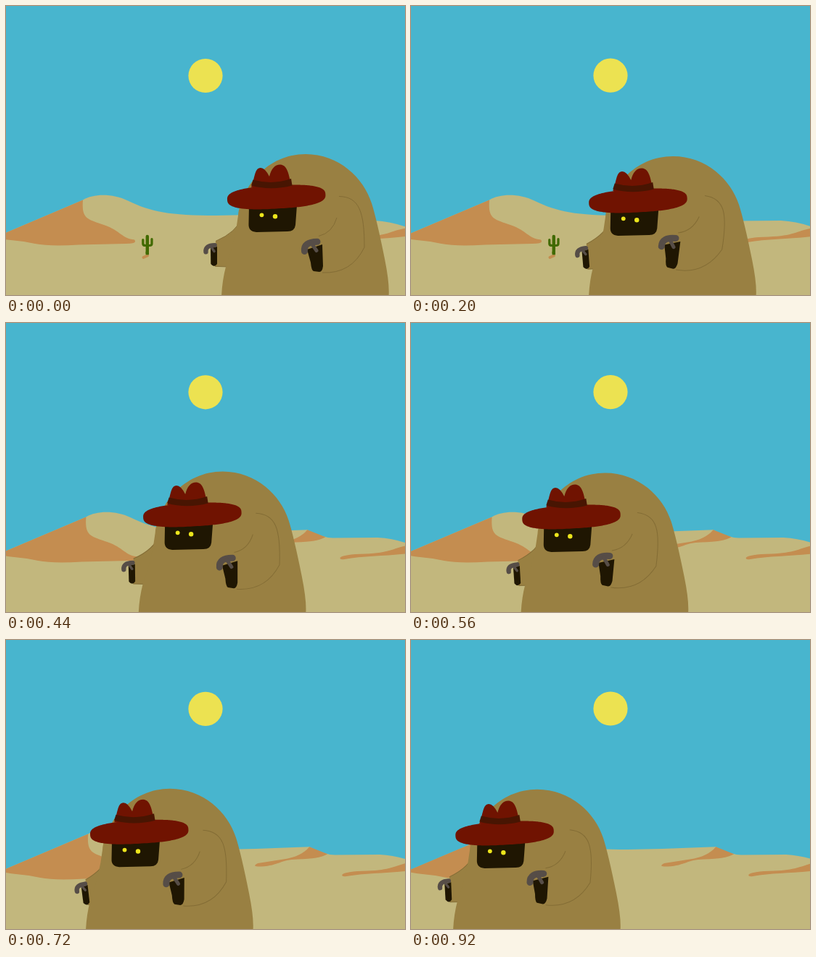
An HTML page with a canvas that plays this animation: 550x400 px, repeating every 960 ms.

```html
<!DOCTYPE html>
<html lang="en">
<head>
<meta charset="utf-8">
<title>Desert wanderer</title>
<style>
  html, body { margin: 0; width: 100%; height: 100%; overflow: hidden; background: #48b5ce; }
  canvas { display: block; }
</style>
</head>
<body>
<canvas id="stage" width="550" height="400"></canvas>
<script>
const ctx = document.getElementById('stage').getContext('2d');
const STEP_MS = 40, STEPS = 24, STRIDE = 10;

const color = {
  sky: '#48b5ce', sun: '#ece251', sand: '#c2b77d', shade: '#c48d50', cactus: '#416a00',
  robe: '#998042', seam: '#836c35', dark: '#1f1602', claw: '#564d47',
  hat: '#701301', band: '#481502', eye: '#ece51c'
};

function fill(path, paint) {
  ctx.fillStyle = paint;
  ctx.fill(new Path2D(path));
}

function line(path, paint, width = 1) {
  ctx.strokeStyle = paint;
  ctx.lineWidth = width;
  ctx.stroke(new Path2D(path));
}

function disc(x, y, r, paint) {
  ctx.fillStyle = paint;
  ctx.beginPath();
  ctx.arc(x, y, r, 0, 2 * Math.PI);
  ctx.fill();
}

function group(draw) {
  ctx.save();
  draw();
  ctx.restore();
}

// Applies a linear map around (x, y), then shifts by (dx, dy).
function pivot(x, y, a, b, c, d, dx, dy) {
  ctx.translate(x + dx, y + dy);
  ctx.transform(a, b, c, d, 0, 0);
  ctx.translate(-x, -y);
}

function superellipse(x, y, rx, ry, tilt, power, paint) {
  const bend = v => Math.sign(v) * Math.abs(v) ** (2 / power);
  group(() => {
    ctx.translate(x, y);
    ctx.rotate(tilt);
    ctx.beginPath();
    for (let a = 0; a < 2 * Math.PI; a += 0.03) {
      ctx.lineTo(rx * bend(Math.cos(a)), ry * bend(Math.sin(a)));
    }
    ctx.fillStyle = paint;
    ctx.fill();
  });
}

function drawCactus() {
  ctx.lineCap = 'round';
  line('M189.5 348L195 345.5', color.shade, 4);
  line('M194.8 319V342', color.cactus, 4.4);
  line('M188.8 323.5V329Q189 331.5 192 331.5H198Q201 331.5 201 329V322.5', color.cactus, 3.2);
  ctx.lineCap = 'butt';
  line('M194.8 340V344.3', color.cactus, 4.4);
}

function drawDunes() {
  fill('M-30 401V326.5L106 268.5C122 259 148 260 168 269.5C200 285 225 290 290 290'
    + 'Q350 289 411 286.3Q430 297 446 297.5L508 297Q541 299 570 314V401Z', color.sand);
  fill('M-16 320.5L106 268.5C104 295 112 295 135 303S160 322 177 323.5'
    + 'Q182 329 165 329L100 330.5Q60 333 40 329T0 323.3Z', color.shade);
  fill('M411 286.3Q400 300 375 303.5L340 309Q330 314 345 313.5'
    + 'C370 312 370 304 395 303.5Q425 303 436 296.3Z', color.shade);
  fill('M456 325Q460 320 491 319.5C530 318 530 310 555 307V318.5'
    + 'C520 323 490 322 462 327Q456 328 456 325Z', color.shade);
}

function drawDesert(step) {
  ctx.fillStyle = color.sky;
  ctx.fillRect(0, 0, 550, 400);
  disc(275, 96.5 - 0.065 * step, 23.6, color.sun);
  group(() => {
    ctx.translate(0.4 * step, 0);
    drawDunes();
    drawCactus();
  });
}

function drawClaw(x, y, size) {
  group(() => {
    ctx.translate(x, y);
    ctx.scale(size, size);
    ctx.lineCap = 'round';
    line('M4.5 19Q3 6 22 5.8', color.claw, 9);
    line('M14 8L21 18', color.claw, 5);
  });
}

function drawHead() {
  fill('M335 276H401L399 303Q398 312 388 312L345 313Q334 312 334.5 302Z', color.dark);
  disc(352.5, 289.3, 2.9, color.eye);
  disc(371, 291.2, 3.2, color.eye);
  fill('M338 251C343 240 342 224 351 224Q357 224 363 236Q367 219.5 378 219.5C389 220 390 236 394 251Z', color.hat);
  superellipse(372.7, 264.5, 67.8, 16, -0.055, 2.7, color.hat);
  fill('M340.5 240.5Q367 248 393 239L394.5 248.5Q365 256 338 248.5Z', color.band);
}

function drawWanderer(step) {
  const beat = step % STRIDE;
  const lean = beat <= 5 ? beat / 5 : (9 - beat) / 4;
  const swing = 0.0145 * beat;
  const cos = Math.cos(swing), sin = Math.sin(swing);
  const leftArm = () => pivot(281, 335, cos, -sin, sin, cos, 1.1 * beat, 0.9 * beat);

  ctx.translate(-10.39 * step, 0);
  group(() => {
    leftArm();
    const cuff = 'M325 293Q318 313 289 325.5', hem = 'L288 360.3L306 361';
    fill(cuff + hem + 'Z', color.robe);
    line(cuff, color.seam);
    line('M288 360.3L306 361', color.seam);
  });
  group(() => {
    pivot(0, 400, 1, 0, 0, 1 - 0.0154 * lean, 0, 0);
    fill('M297 402Q298 380 303 361Q316 325 320 290C325 250 360 205 413 205'
      + 'C459 205 493 238 504 273Q511 295 522 350Q529 385 527.5 402Z', color.robe);
  });
  group(() => {
    leftArm();
    fill('M282 335L291 333V357Q287 363 282.3 357Z', color.dark);
    drawClaw(272.3, 327, 0.7);
  });
  group(() => {
    pivot(460, 263, 1, 0.12 * lean, -0.16 * lean, 1, -2 * lean, -lean);
    line('M459 263.5C487 264 494 285 494 334Q476 371 436 369', color.seam);
    line('M456 293Q450 314 431 318.5', color.seam);
    fill('M415 337L436 330L437 360Q436 368 432 368L424 367Q421 366 420 355Z', color.dark);
    drawClaw(407, 320.5, 1);
  });
  group(() => {
    ctx.translate(-7.8 * lean, 5 * lean);
    drawHead();
  });
}

function render(now) {
  const step = Math.floor(now / STEP_MS) % STEPS;
  drawDesert(step);
  group(() => drawWanderer(step));
}

const start = performance.now();
function tick() {
  render(performance.now() - start);
  requestAnimationFrame(tick);
}
tick();
</script>
</body>
</html>
```
